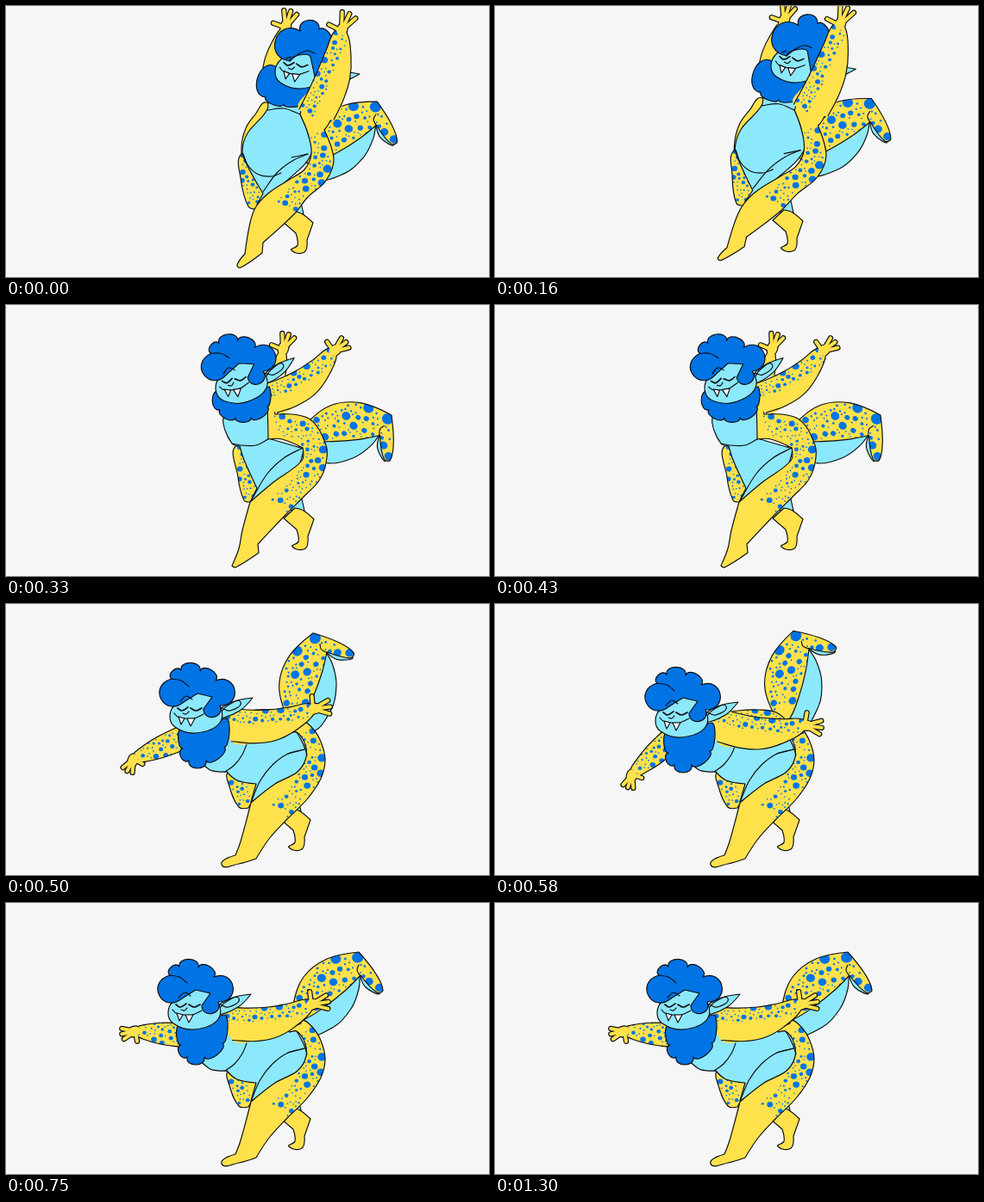
Write an HTML page that moves like this. It is 560 px wide and 315 px high and loops after 1660 ms.

```html
<!DOCTYPE html>
<html lang="en">
<head>
<meta charset="utf-8">
<title>Dancing creature</title>
<style>
html, body { margin: 0; width: 100%; height: 100%; overflow: hidden; background: #f6f6f6; }
svg { display: block; width: 100%; height: 100%; stroke-linejoin: round; stroke-linecap: round; }
</style>
</head>
<body>
<svg id="stage" viewBox="0 0 560 315"></svg>
<script>
const YELLOW = '#ffe14b', BLUE = '#0074e4', CYAN = '#8ce8fb', INK = '#0c0c10', PEN = 1.15;
const still = (x, y) => [x, y];
let warp = still, clips = 0;

const parse = src => src.split(' ').map(s => {
  const [x, y, bulge = .55] = s.split(',').map(parseFloat);
  return { at: warp(x, y), bulge, sharp: s.endsWith('!') };
});

// Smooth curve through points; sharp points become corners.
function curve(p, closed) {
  const n = p.length;
  const get = i => closed ? p[(i + n) % n] : p[Math.max(0, Math.min(n - 1, i))];
  const dir = i => {
    if (get(i).sharp) return [0, 0];
    const [ax, ay] = get(i - 1).at, [bx, by] = get(i + 1).at;
    const len = Math.hypot(bx - ax, by - ay) || 1;
    return [(bx - ax) / len, (by - ay) / len];
  };
  let d = 'M' + p[0].at;
  for (let i = 0; i < (closed ? n : n - 1); i++) {
    const a = get(i).at, b = get(i + 1).at, u = dir(i), v = dir(i + 1);
    const k = Math.hypot(b[0] - a[0], b[1] - a[1]) * .35;
    d += 'C' + [a[0] + u[0] * k, a[1] + u[1] * k, b[0] - v[0] * k, b[1] - v[1] * k, ...b].map(q => q.toFixed(1));
  }
  return d + (closed ? 'Z' : '');
}

const path = (d, fill, width = PEN, ink = INK) =>
  `<path d="${d}" fill="${fill}" stroke="${width ? ink : 'none'}" stroke-width="${width}"/>`;
const line = (src, width) => path(curve(parse(src)), 'none', width);

function seeded(seed) {
  return () => {
    seed = (seed * 16807) % 2147483647;
    return seed / 2147483647;
  };
}

// Non-overlapping spots that shrink away from an edge; wide < 0 flips the side.
function speckle(edge, wide, big) {
  const rand = seeded(4711), kept = [];
  for (let i = 0; i < edge.length * 50; i++) {
    const t = rand() * (edge.length - 1), k = Math.floor(t), depth = rand();
    const [ax, ay] = edge[k], [bx, by] = edge[k + 1];
    const dx = bx - ax, dy = by - ay, off = depth * wide / Math.hypot(dx, dy);
    const x = ax + dx * (t - k) - dy * off, y = ay + dy * (t - k) + dx * off;
    const r = Math.max(.8, big * (1 - .7 * depth) * (1.1 - .9 * Math.min(1, i / 60)) * (.75 + .25 * rand()));
    if (kept.every(s => Math.hypot(s.x - x, s.y - y) > s.r + r + 1.8)) kept.push({ x, y, r });
  }
  return kept.map(({ x, y, r }) =>
    `<ellipse cx="${x.toFixed(1)}" cy="${y.toFixed(1)}" rx="${(r * 1.08).toFixed(1)}" ry="${r.toFixed(1)}" fill="${BLUE}"/>`).join('');
}

function spotted(d, spots, outline = d) {
  const id = 'c' + clips++;
  return `<clipPath id="${id}"><path d="${d}"/></clipPath>` + path(d, YELLOW, 0) +
    `<g clip-path="url(#${id})">${spots}</g>` + path(outline, 'none');
}

// Spots, if any, follow the outline between two of its points.
function shape(fill, src, spots) {
  const p = parse(src), d = curve(p, true);
  if (!spots) return path(d, fill);
  const { from, to, wide, big } = spots;
  return spotted(d, speckle(p.slice(from, to + 1).map(q => q.at), wide, big));
}

// Curly outline: every side bulges outward by its start point's third value.
function cloud(src) {
  const p = parse(src);
  return path(p.reduce((d, { at: [ax, ay], bulge: h }, i) => {
    const [bx, by] = p[(i + 1) % p.length].at, dx = bx - ax, dy = by - ay, e = .2 * h;
    return d + 'C' + [ax + dy * h - dx * e, ay - dx * h - dy * e, bx + dy * h + dx * e, by - dx * h + dy * e, bx, by];
  }, 'M' + p[0].at) + 'Z', BLUE);
}

function fingers(x, y, dir, len, pen, color) {
  const ray = (turn, reach, w) => {
    const a = (dir + turn) * Math.PI / 180;
    return path(`M${x} ${y}l${Math.cos(a) * reach} ${Math.sin(a) * reach}`, 'none', w + pen, color);
  };
  return ray(0, 3, 11) + ray(-85, len * .75, 4) + [-20, 3, 26].map(a => ray(a, len, 4)).join('');
}

// Tapered arm from shoulder to hand, bowed by sag, open at the shoulder.
function arm(x0, y0, x1, y1, { w, sag = 0, wide, big = 5, dir, len }) {
  [x0, y0] = warp(x0, y0);
  [x1, y1] = warp(x1, y1);
  const dx = x1 - x0, dy = y1 - y0, l = Math.hypot(dx, dy), nx = -dy / l, ny = dx / l;
  const side = s => [0, .25, .5, .75, 1].map(t => {
    const o = sag * Math.sin(Math.PI * t) + s * w / 2 * (1 - .7 * t ** 3);
    return { at: [x0 + dx * t + nx * o, y0 + dy * t + ny * o] };
  });
  const top = side(-1), p = [...top, ...side(1).reverse()];
  return fingers(x1, y1, dir, len, 2 * PEN, INK) +
    spotted(curve(p, true), wide ? speckle(top.map(q => q.at), wide, big) : '', curve(p)) +
    fingers(x1, y1, dir, len, 0, YELLOW);
}

const move = (art, x, y, turn = 0, px = 0, py = 0) =>
  `<g transform="translate(${x} ${y}) rotate(${turn} ${px} ${py})">${art}</g>`;

// Parts shared by several poses
const TAIL =
  shape(CYAN, '410,82! 409,100 400,123 380,144 345,153 345,125') +
  shape(CYAN, '410,82! 433,104 417,98') +
  shape(YELLOW, '334,135 333,118 345,86 372,65 409,57! 428,81 437,101 430,104 411,84! 393,102 369,121 346,135',
    { from: 1, to: 6, wide: 38, big: 8 }) +
  line('409,72 407,78 411,85');
const tail = (x, y, turn) => move(TAIL, x, y, turn, 345, 140);

const BOOT =
  shape(CYAN, '326,232! 341,224! 345,242! 330,242!') +
  shape(YELLOW, '334,239! 321,251! 336,264! 338,278 331,284 346,286 349,272! 356,252! 344,242');

const EAR =
  shape(CYAN, '243,127 262,114 286,109! 271,124 247,133') +
  line('249,126 257,118 272,114 260,124 250,121');
const SKIN = shape(CYAN, '190,130 197,116 222,102 246,115 248,138 220,150 196,143');
const FEATURES =
  line('199,121 204,124 211,120', 1.7) + line('214,121 220,124 227,121', 1.7) +
  line('201,116 206,114') + line('205,127 209,128 212,125') +
  line('195,127 199,131 208,133 218,133 229,128') +
  shape('#fff', '200,131! 203,140! 207,133!') + shape('#fff', '210,133! 214,142! 219,133!');
const HAIR =
  cloud('192,87 203,77 225,78,.5 243,89,.9 248,118,.8 229,122,0 239,108,0 222,104,0 206,114,.95') +
  line('192,87 203,89 212,96') + line('202,113 209,107 216,111');
const FACE = EAR + SKIN + FEATURES + HAIR;
const HEAD = cloud('255,133,.2 253,166,.35 232,182,.6 212,182 205,168,.25 203,145,0') + FACE;

// Upright pose, arms overhead; bend shifts every point.
function upright(bend, dx, dy, turn) {
  warp = bend;
  const back = arm(307, 100, 324, 25, { w: 24, sag: -4, dir: -75, len: 20 }) +
    shape(CYAN, '398,77! 410,79! 399,85!');
  const trunk =
    shape(YELLOW, '302,112 289,126 278,142 273,165 277,180 300,180 308,130') +
    shape(YELLOW, '292,236! 281,233 272,200 273,172 286,186 302,217!', { from: 1, to: 3, wide: 17, big: 4 }) +
    shape(CYAN, '306,95 303,120 280,148 274,168 278,182 298,218! 291,231! 328,201 354,172 350,148 341,126! 352,100') +
    line('303,121 322,119 341,126') + line('275,172 281,186 293,196 308,198 319,194') +
    line('350,172 332,180 314,194 298,216') + line('331,176 350,172');
  const beard = cloud('350,88,.15 349,110,.25 322,114,.3 301,106 312,70,0');
  const hair = cloud('329,64,.85 341,29,.7 363,27,.4 376,55,.1 358,82,0 353,59,-.25') +
    line('329,64 339,56 350,52 358,55');
  const side = shape(YELLOW, '352,110 341,126! 350,148 354,172 346,190 328,202 305,217 290,233 283,252 277,288! 268,301 272,304 297,287! 298,275! 334,242 350,222 371,203 380,178 369,144! 376,128',
    { from: 14, to: 18, wide: -24, big: 6 }) +
    arm(360, 126, 389, 29, { w: 42, sag: 6, wide: 18, dir: -68, len: 22 });
  warp = still;
  return back + tail(13 + dx * .6, 47 + dy * .7, 6 + turn) + move(BOOT, turn, -2 * turn) + trunk + beard +
    move(SKIN, 122 + dx, -54 + dy) + hair + move(FEATURES, 122 + dx, -54 + dy, 6, 213, 130) + side;
}

const sway = (x, y) => [
  x + 12 - .045 * y - Math.max(0, y - 200) * .08,
  y - 7 + .015 * y - Math.max(0, y - 230) * .08
];

function swing() {
  const farArm = arm(316, 80, 321, 52, { w: 16, dir: -72, len: 19 });
  const body =
    shape(YELLOW, '283,229! 276,227 269,200 269,163 287,195 292,215', { from: 1, to: 3, wide: 17, big: 4 }) +
    shape(CYAN, '256,125 252,138 262,161 271,164! 276,180 291,213! 283,229! 336,192 345,167! 304,155! 308,120 285,110') +
    line('262,161 272,163 290,163 304,156');
  const side = shape(YELLOW, '300,95 303,120 304,156! 320,156 344,166! 343,181 310,206 283,229! 274,262 270,283 262,303! 266,305 293,288! 292,278! 325,243 346,222 363,204 371,184 371,163 351,132 312,127!',
    { from: 14, to: 20, wide: -24, big: 6 }) +
    line('344,166 322,178 303,196 285,226');
  const nearArm = arm(303, 110, 380, 54, { w: 38, sag: 10, wide: 18, dir: -40, len: 18 });
  const beard = cloud('304,95,.2 303,118,.4 284,131,.4 266,131,.4 248,122,.5 247,100,0');
  return farArm + tail(2.5, 21, 34) + move(BOOT, 1, -3) + body + side + nearArm + beard +
    move(FACE, 52, -35, -10, 213, 125);
}

// Leaning pose: only tail, arms and head move.
const TRUNK =
  shape(YELLOW, '281,237! 270,236 259,212 258,195 272,202 290,209', { from: 1, to: 3, wide: 18, big: 4 }) +
  shape(CYAN, '225,150 217,168 235,192 256,195! 268,205 290,209! 284,230! 338,196 349,178 337,149! 300,140 255,140') +
  line('279,163 274,175 265,187 254,195') +
  shape(YELLOW, '328,149 337,149 346,161 348,178 338,195 312,209 284,231! 272,276 266,292! 250,303 270,302 290,296! 305,273 326,250 349,227 365,203 370,181 365,160 355,144 342,136',
    { from: 13, to: 18, wide: -24, big: 6 }) +
  line('346,169 327,174 309,187 295,205 285,228') + line('327,174 346,169') +
  shape(YELLOW, '255,130 282,124 306,123 326,126 342,140! 300,150', { from: 0, to: 4, wide: 14, big: 5 });

const lean = ({ turn, lift = 0, far, farDir, near, nearDir, head }) =>
  arm(208, 154, ...far, { w: 27, wide: 24, big: 4, dir: farDir, len: 16 }) +
  tail(0, -lift, turn) + move(BOOT, -3, -1) + TRUNK +
  arm(258, 140, ...near, { w: 40, sag: 10, wide: 16, dir: nearDir, len: 20 }) + move(HEAD, ...head);

const POSES = [
  [160, upright(still, 0, 0, 0)],
  [170, upright(sway, 8, -7, 1)],
  [170, swing()],
  [80, lean({ turn: -31.5, lift: 2, far: [148, 180], farDir: 115, near: [356, 122], nearDir: -10, head: [0, 0] })],
  [80, lean({ turn: -37, lift: 4, far: [159, 198], farDir: 105, near: [359, 141], nearDir: 5, head: [-4, 5] })],
  [90, lean({ turn: -3.3, far: [149, 146], farDir: 165, near: [352, 111], nearDir: -12, head: [-1, -4] })],
  [910, lean({ turn: 0, far: [150, 149], farDir: 165, near: [354, 118], nearDir: -12, head: [-2, -3] })]
];
const LOOP = POSES.reduce((sum, [ms]) => sum + ms, 0);
const stage = document.getElementById('stage');
let shown = -1, start = null;

function draw(ms) {
  let t = ms % LOOP, i = 0;
  while (t >= POSES[i][0]) t -= POSES[i++][0];
  if (i !== shown) stage.innerHTML = POSES[shown = i][1];
}

function tick(now) {
  start ??= now;
  draw(now - start);
  requestAnimationFrame(tick);
}
draw(0);
requestAnimationFrame(tick);
</script>
</body>
</html>
```
